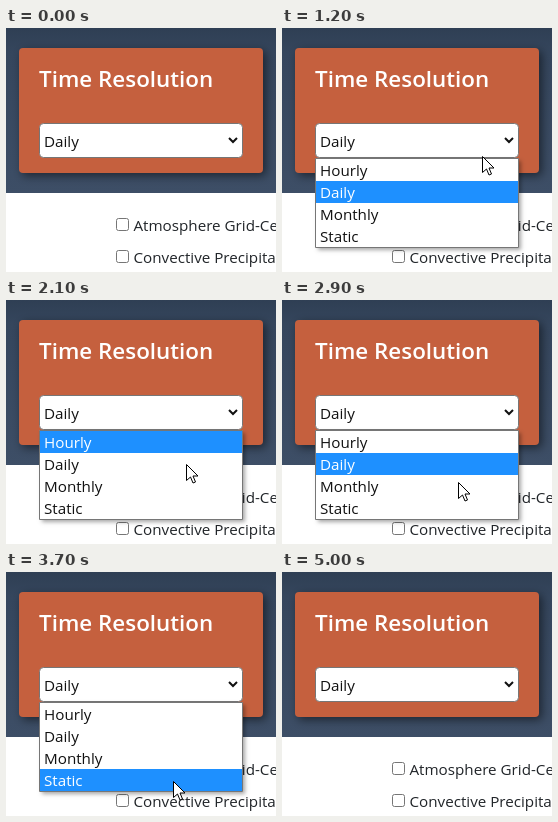
These frames come from a looping animation (270x244 px, 5.1 s). An HTML page with a canvas:

```html
<!DOCTYPE html>
<html lang="en">
<head>
<meta charset="utf-8">
<title>Time Resolution</title>
<style>
  html, body { margin: 0; width: 100%; height: 100%; overflow: hidden; background: #fff; }
  canvas { display: block; }
</style>
</head>
<body>
<canvas id="stage" width="270" height="244"></canvas>
<script>
const ctx = document.getElementById('stage').getContext('2d');
const LOOP = 5100, STEP = 100;
const OPEN = 800, CLOSE = 4700;
const OPTIONS = ['Hourly', 'Daily', 'Monthly', 'Static'];
const ROW = 22, MENU_TOP = 131;

// Highlighted option: [start time, row]
const PICKS = [[0, 1], [1400, 0], [2200, 1], [3000, 2], [3500, 3]];

// Pointer tip: [time, x, y]
const PATH = [
  [0, 226, -30], [400, 214, 108], [600, 214, 108], [900, 207, 116],
  [1000, 207, 116], [1200, 200, 128], [1500, 193, 143], [1600, 193, 143],
  [2100, 180, 164], [2200, 179, 167], [2800, 177, 179], [2900, 176, 182],
  [3500, 168, 206], [3600, 168, 206], [3700, 167, 209], [4000, 160, 250]
];

function pointerAt(t) {
  const i = PATH.findIndex(p => p[0] >= t);
  if (i < 1) return null;
  const [t0, x0, y0] = PATH[i - 1], [t1, x1, y1] = PATH[i];
  const k = (t - t0) / (t1 - t0);
  return [Math.round(x0 + (x1 - x0) * k), Math.round(y0 + (y1 - y0) * k)];
}

function text(str, x, y, color = '#212529', font = '15.2px') {
  ctx.font = font + ' "Open Sans", "Noto Sans", sans-serif';
  ctx.fillStyle = color;
  ctx.fillText(str, x, y);
}

function box(x, y, w, h, r, fill, stroke) {
  ctx.beginPath();
  ctx.roundRect(x, y, w, h, r);
  ctx.fillStyle = fill;
  ctx.fill();
  if (!stroke) return;
  ctx.shadowColor = 'transparent';
  ctx.strokeStyle = stroke;
  ctx.lineWidth = 1;
  ctx.stroke();
}

function shadowed(offset, blur, color, draw) {
  ctx.save();
  ctx.shadowOffsetX = ctx.shadowOffsetY = offset;
  ctx.shadowBlur = blur;
  ctx.shadowColor = color;
  draw();
  ctx.restore();
}

function drawPage() {
  ctx.fillStyle = '#fff';
  ctx.fillRect(0, 0, 270, 244);
  const shade = ctx.createLinearGradient(0, 0, 0, 165);
  shade.addColorStop(0, '#2f3f54');
  shade.addColorStop(0.15, '#35465d');
  shade.addColorStop(1, '#3d4e66');
  ctx.fillStyle = shade;
  ctx.fillRect(0, 0, 270, 165);

  ctx.save();
  ctx.beginPath();
  ctx.rect(0, 0, 270, 165);
  ctx.clip();
  shadowed(3, 10, 'rgba(0,0,0,.5)', () => box(13, 20, 244, 125, 4, '#c5603e'));
  ctx.restore();

  text('Time Resolution', 33, 59, '#fff', '600 22.4px');
  box(33.5, 95.5, 203, 34, 4, '#fff', '#767676');
  text('Daily', 38, 119, '#111');
  ctx.beginPath();
  ctx.moveTo(223, 110);
  ctx.lineTo(227, 114);
  ctx.lineTo(231, 110);
  ctx.strokeStyle = '#111';
  ctx.lineWidth = 2;
  ctx.stroke();

  ['Atmosphere Grid-Cell', 'Convective Precipitation'].forEach((label, i) => {
    const y = 190.5 + i * 32;
    box(110.5, y, 12, 12, 2, '#fff', '#767676');
    text(label, 127.5, y + 12.5);
  });
}

function drawMenu(t) {
  shadowed(2, 4, 'rgba(0,0,0,.35)', () =>
    box(33.5, MENU_TOP - 0.5, 203, 89, 0, '#fff', '#767676'));
  const picked = PICKS.filter(p => p[0] <= t).pop()[1];
  OPTIONS.forEach((name, i) => {
    const y = MENU_TOP + i * ROW;
    if (i === picked) {
      ctx.fillStyle = '#1e90ff';
      ctx.fillRect(34, y, 202, ROW);
    }
    text(name, 38, y + 17, i === picked ? '#fff' : '#111');
  });
}

function drawPointer(x, y) {
  ctx.save();
  ctx.translate(x + 0.5, y + 0.5);
  const arrow = new Path2D('M0 0V16L4 12.5L6.5 18.5L9 17.5L6.5 11.5H11.5Z');
  ctx.fillStyle = '#fff';
  ctx.fill(arrow);
  ctx.strokeStyle = '#000';
  ctx.lineWidth = 1;
  ctx.stroke(arrow);
  ctx.restore();
}

function frame() {
  const t = Math.floor(performance.now() % LOOP / STEP) * STEP;
  drawPage();
  if (t >= OPEN && t < CLOSE) drawMenu(t);
  const tip = pointerAt(t);
  if (tip) drawPointer(...tip);
  requestAnimationFrame(frame);
}
frame();
</script>
</body>
</html>
```
